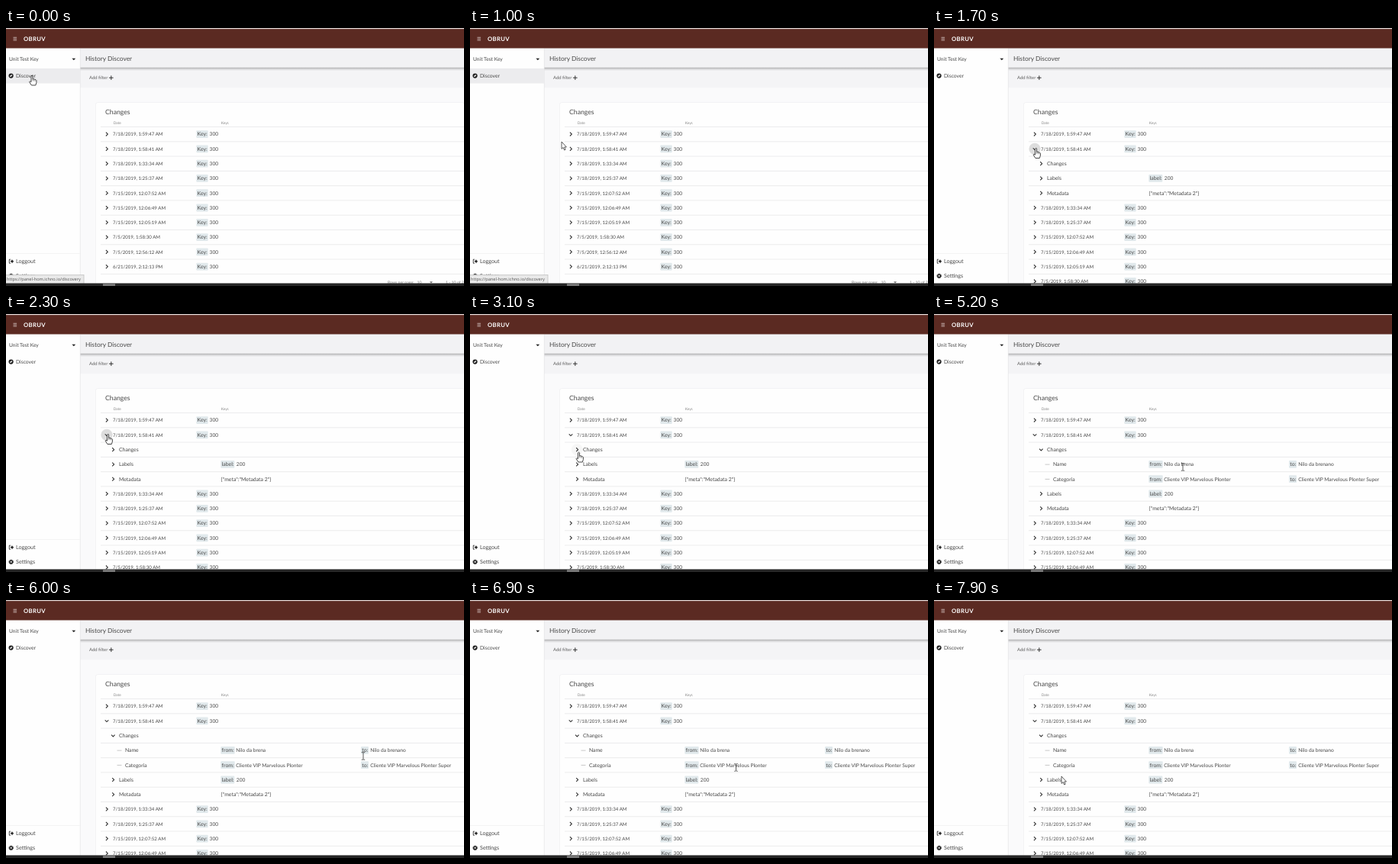
Write an HTML page that moves like this. It is 600 by 338 pixels and loops after 8 s.

```html
<!DOCTYPE html>
<html lang="en">
<head>
<meta charset="utf-8">
<title>History Discover</title>
<style>
  html, body { margin: 0; width: 100%; height: 100%; overflow: hidden; background: #fafafb; }
  svg { display: block; width: 600px; height: 338px; }
  text {
    font-family: Lato, "Open Sans", sans-serif; fill: #484848;
    white-space: pre; text-rendering: geometricPrecision;
  }
</style>
</head>
<body>
<svg id="stage" viewBox="0 0 600 338" xmlns="http://www.w3.org/2000/svg"></svg>
<script>
const LOOP = 8000, STEP = 100;
const ROW_TOP = 139.1, PITCH = 19.28;

const rect = (x, y, w, h, fill, extra = '') =>
  `<rect x="${x}" y="${y}" width="${w}" height="${h}" fill="${fill}" ${extra}/>`;
const text = (x, y, size, str, extra = '') =>
  `<text x="${x}" y="${y}" font-size="${size}" ${extra}>${str}</text>`;
const line = (d, width = 1, color = '#333', extra = '') =>
  `<path d="${d}" fill="none" stroke="${color}" stroke-width="${width}" ${extra}/>`;

const chevron = (x, y, open) => open
  ? line(`M${x - 2.3} ${y - 1.1}l2.3 2.3 2.3-2.3`, 1.1)
  : line(`M${x - 1.1} ${y - 2.4}l2.4 2.4-2.4 2.4`, 1.1);

const badge = (x, y, w, label, value, gap) =>
  rect(x, y - 4.9, w, 9.8, '#e1e9ec', 'rx="1"') +
  text(x + 1.3, y + 2.3, 6.9, label) + text(x + gap, y + 2.3, 6.65, value);

// Row kinds
const entry = (date, open) => y =>
  chevron(132, y, open) + text(140, y + 2.3, 6.15, date) + badge(249.3, y, 15.4, 'Key:', '300', 17.3);
const section = (label, open, extra = () => '') => y =>
  chevron(140.3, y, open) + text(148, y + 2.3, 6.85, label) + extra(y);
const change = (label, from, to) => y =>
  line(`M145.5 ${y + .2}h6`, .8, '#bbb') + text(156, y + 2.3, 6.8, label) +
  badge(281.3, y, 18.4, 'from:', from, 20) + badge(465, y, 10, 'to:', to, 12.3);

const dates = ['7/18/2019, 1:59:47 AM', '7/18/2019, 1:58:41 AM', '7/18/2019, 1:33:34 AM',
  '7/18/2019, 1:25:37 AM', '7/15/2019, 12:07:52 AM', '7/15/2019, 12:06:49 AM',
  '7/15/2019, 12:05:19 AM', '7/5/2019, 1:58:30 AM', '7/5/2019, 12:56:12 AM', '6/21/2019, 2:12:13 PM'];
const details = [
  section('Labels', false, y => badge(281.3, y, 18, 'label:', '200', 20.5)),
  section('Metadata', false, y => text(281.5, y + 2.3, 6.9, '{"meta":"Metadata 2"}'))
];
const edits = [
  change('Name', 'Nilo da brena', 'Nilo da brenano'),
  change('Categoria', 'Cliente VIP Marvelous Plonter', 'Cliente VIP Marvelous Plonter Super')
];

function table(inner) {
  const open = inner.length > 0;
  const rows = [entry(dates[0]), entry(dates[1], open), ...inner, ...dates.slice(2).map(d => entry(d))];
  return rows.slice(0, 11).map((draw, i) => {
    const y = ROW_TOP + i * PITCH;
    return draw(y) + line(`M124 ${y + 9.7}H600`, .8, '#e7e7e9');
  }).join('');
}

const footer = text(500, 335, 5.2, 'Rows per page:   10', 'fill-opacity=".7"') +
  '<path d="M555 332.3h4l-2 2z" fill="#666"/>' + text(576, 335, 5.2, '1 - 10 of 27', 'fill-opacity=".7"');

const tables = [
  table([]) + footer,
  table([section('Changes', false), ...details]),
  table([section('Changes', true), ...edits, ...details])
];

const cursors = {
  hand: `<path d="M-1 .8Q0-.6 1 .8V5l1.4-.3 1.3.6 1.2.3 1 1V9.5L4.8 13H-.6L-3.4 8.6Q-3.2 7-1 8.6Z"
    fill="#fff" stroke="#333" stroke-width=".9" stroke-linejoin="round"/>` +
    line('M1 5v2.4M2.6 5.3v2.3M4.2 5.8v2', .5),
  arrow: `<path d="M0 0V9.4L2.1 7.5 3.6 11l1.5-.7L3.7 7H6.4Z" fill="#fff" stroke="#333"
    stroke-width=".8" stroke-linejoin="round"/>`,
  beam: line('M-2.2-4.4h1.5L0-3.8 .7-4.4H2.2M0-3.8V4.6M-2.2 5.2h1.5L0 4.6.7 5.2H2.2', .8)
};

const stage = document.getElementById('stage');
stage.innerHTML = `
<defs>
  <linearGradient id="shade" x2="0" y2="1">
    <stop stop-color="#000" stop-opacity=".3"/><stop offset=".4" stop-color="#000" stop-opacity=".14"/>
    <stop offset="1" stop-color="#000" stop-opacity="0"/>
  </linearGradient>
</defs>` +
  rect(0, 0, 600, 338, '#fafafb') +
  rect(97, 52, 503, 26.3, '#f4f4f6') +
  rect(97, 26.4, 503, 25.6, '#f2f2f4') + rect(97, 51.8, 503, 4.2, 'url(#shade)') +
  rect(117.4, 97.4, 483, 240, '#eeeef0', 'rx="2"') + rect(118, 98, 482, 240, '#fefefe', 'rx="2"') +
  rect(0, 26.4, 97, 311, '#fefefe') + line('M97.3 27V335', .7, '#e4e4e6') +
  rect(0, 53, 97, 19.5, '#ececee', 'id="active"') +
  line('M0 295.5H97', .6, '#eee') +
  rect(0, 0, 600, 1.2, '#e4dcda') + rect(0, 1.2, 600, 25.3, '#5b2a22') +
  line('M9.5 12.3h4.6M9.5 14.2h4.6M9.5 16.1h4.6', .7, '#e8dcda') +
  text(23, 17, 7.7, 'OBRUV', 'style="fill:#fff" font-weight="700" letter-spacing=".35"') +
  text(4, 43, 6.7, 'Unit Test Key') + '<path d="M86.4 39.7h4.8l-2.4 2.5z" fill="#222"/>' +
  '<circle cx="6.6" cy="62.6" r="3.1" fill="#222"/><path d="M8.3 60.9l-1 2.4-2.4 1 1-2.4z" fill="#fff"/>' +
  text(13, 65.2, 6.8, 'Discover') +
  '<path d="M6 304.8h1.6V303l2.5 2.7-2.5 2.7v-1.8H6z" fill="#222"/>' +
  line('M6 303.2H4.3v5H6', .9) + text(13, 308, 7.2, 'Loggout') +
  '<circle cx="6.7" cy="324.8" r="1.8" fill="none" stroke="#222" stroke-width="1.5"/>' +
  '<circle cx="6.7" cy="324.8" r="2.8" fill="none" stroke="#222" stroke-width="1" stroke-dasharray="1.3 .9"/>' +
  text(13, 327.4, 7.2, 'Settings') +
  text(104, 42.7, 8.4, 'History Discover') +
  text(109, 67.3, 5.95, 'Add filter', 'fill-opacity=".85"') + line('M135 65.2h5.6M137.8 62.4V68', 1) +
  text(130, 113.2, 8.7, 'Changes') +
  text(140.7, 126.4, 4.8, 'Date', 'fill-opacity=".65"') +
  text(281.7, 126.4, 4.8, 'Keys', 'fill-opacity=".65"') +
  line('M124 129.5H600', .8, '#e7e7e9') +
  '<circle id="halo1" cx="132" cy="158.4" r="7.6"/><circle id="halo2" cx="140.3" cy="177.7" r="7.6"/>' +
  tables.map((t, i) => `<g id="table${i}">${t}</g>`).join('') +
  `<g id="status">${rect(-1, 323.6, 103, 12, '#e9e9e9', 'stroke="#bbb" stroke-width=".7"')}${
    text(1, 331.4, 5.65, 'https://panel-hom.ichno.io/discovery', 'style="font-family:\'Open Sans\',sans-serif;fill:#555"')}</g>` +
  rect(0, 334.4, 600, 4, '#262626') + rect(127, 334.6, 16, 4, '#757575') +
  Object.entries(cursors).map(([k, c]) => `<g id="${k}">${c}</g>`).join('');

// time, x, y, pointer shape from that time on
const path = [
  [0, 34, 62, 'hand'], [100, 34, 62, 'hand'], [400, 52, 81, 'arrow'], [1000, 120, 149, 'arrow'],
  [1300, 131, 156, 'hand'], [1400, 133.5, 157.5, 'hand'], [2600, 133.5, 157.5, 'hand'],
  [2800, 136, 166, 'arrow'], [3000, 141, 178, 'hand'], [3100, 142.5, 181, 'hand'],
  [4000, 142.5, 181, 'hand'], [4100, 166, 184, 'arrow'], [4400, 303, 203, 'beam'],
  [4500, 317, 206, 'beam'], [4800, 317, 206, 'beam'], [5200, 326, 200, 'beam'],
  [5300, 326, 200, 'beam'], [5500, 348, 201, 'arrow'], [6000, 468, 204, 'beam'],
  [6200, 459, 201, 'arrow'], [6500, 384, 213, 'beam'], [6700, 370, 215, 'beam'],
  [6800, 370, 215, 'beam'], [6900, 348.5, 219, 'beam'], [7200, 278, 224, 'arrow'],
  [7700, 196, 231, 'arrow'], [7900, 167, 231, 'arrow']
];
const halo1 = [[0, 0], [1300, .04], [1600, .13], [2500, .04], [2700, 0]];
const halo2 = [[0, 0], [3000, .03], [3400, .12], [3600, .03], [4100, 0]];
const status = [[0, 1], [1200, .5], [1300, 0]];

const $ = id => document.getElementById(id);
const last = (steps, t) => steps.findLastIndex(s => s[0] <= t);
const fade = (id, steps, t) => $(id).setAttribute('opacity', steps[last(steps, t)][1]);
const show = (id, on) => $(id).setAttribute('display', on ? 'inline' : 'none');

function draw(now) {
  const t = Math.floor(now % LOOP / STEP) * STEP;
  const i = last(path, t), a = path[i], b = path[i + 1] || a;
  const k = b === a ? 0 : (t - a[0]) / (b[0] - a[0]);
  const x = a[1] + (b[1] - a[1]) * k, y = a[2] + (b[2] - a[2]) * k;
  for (const name in cursors) {
    show(name, name === a[3]);
    $(name).setAttribute('transform', `translate(${x} ${y})`);
  }
  const state = t < 1700 ? 0 : t < 3400 ? 1 : 2;
  tables.forEach((_, n) => show('table' + n, n === state));
  show('active', t < 1600);
  fade('halo1', halo1, t);
  fade('halo2', halo2, t);
  fade('status', status, t);
}

function tick() {
  draw(performance.now());
  requestAnimationFrame(tick);
}
draw(0);
requestAnimationFrame(tick);
</script>
</body>
</html>
```
